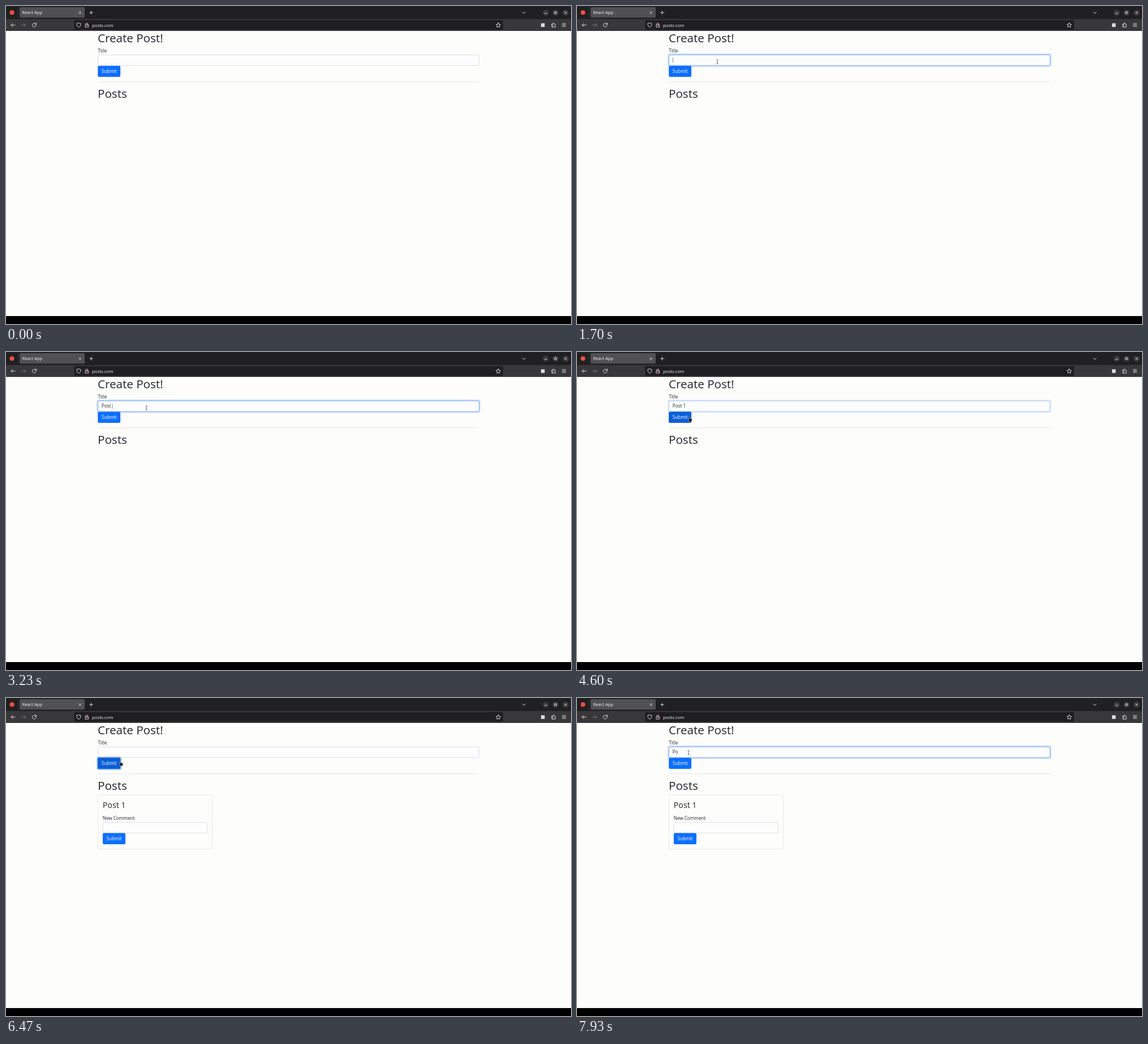
These frames come from a looping animation (998 by 561 pixels, 8 s). An HTML page:

```html
<!DOCTYPE html>
<html lang="en">
<head>
<meta charset="utf-8">
<title>Create Post</title>
<style>
  html, body { margin: 0; width: 100%; height: 100%; overflow: hidden; background: #000; }
  svg { display: block; width: 998px; height: 561px; }
  text { font: 8.15px "Open Sans", "Noto Sans", sans-serif; fill: #212529; white-space: pre; }
  .h1 { font-size: 20.6px; font-weight: 500; }
  .h3 { font-size: 14.2px; font-weight: 500; }
  .bar { font-size: 7.6px; fill: #fbfbfe; }
  .white { fill: #fff; }
  .icon { fill: none; stroke: #ededf0; stroke-width: .9; stroke-linecap: round; stroke-linejoin: round; }
  .field { fill: #fdfdfd; stroke: #d3d6de; stroke-width: .8; }
  .button { fill: #0d6efd; }
</style>
</head>
<body>
<svg viewBox="0 0 998 561">
  <rect width="998" height="547" fill="#fdfdfc"/>

  <!-- Browser frame -->
  <rect width="998" height="23" fill="#202023"/>
  <rect y="23" width="998" height="21" fill="#38383b"/>
  <path d="M21.5 2V21" stroke="#39393d" stroke-width=".8"/>
  <rect x="24" y="2" width="115" height="18.5" rx="2" fill="#515154"/>
  <rect x="120.5" y="25" width="757.5" height="17" rx="2" fill="#1f1f22"/>
  <circle cx="10.5" cy="11.5" r="4" fill="#f0503c"/>
  <text class="bar" x="28.5" y="14.3">React App</text>
  <text class="bar" x="152" y="36.5" style="font-size:7.8px">posts.com</text>
  <g fill="#3c3c3f">
    <circle cx="953.3" cy="11.7" r="5.3"/><circle cx="970.8" cy="11.7" r="5.3"/><circle cx="988.5" cy="11.7" r="5.3"/>
  </g>
  <g class="icon">
    <path d="M129 10l3.4 3.4m0-3.4L129 13.400M147.700 11.700h5.600m-2.800-2.800v5.600"/>
    <path d="M912 10.500l2.700 2.700 2.700-2.700M951.500 13h3.600M969.300 10.200h3v3h-3zM987 10.200l3 3m0-3l-3 3"/>
    <path d="M16 33.600H9m3-3l-3 3 3 3"/>
    <path d="M27.500 33.600h7m-3-3l3 3-3 3" opacity=".35"/>
    <path d="M52.800 31.700a3.400 3.400 0 1 0 .6 2.400M53.500 29.800v2.500H51"/>
    <path d="M128.500 29.800l3.500 1.100c0 3.400-.8 5.300-3.500 6.700-2.700-1.400-3.500-3.300-3.500-6.700z"/>
    <path d="M140.300 33.300h5.200v3.900h-5.200zM141.300 33.300v-1.500a1.600 1.600 0 0 1 3.200 0v1.500"/>
    <path d="M139.500 30l7 7.300" stroke="#e2506f"/>
    <path d="M869.500 29.600l1.200 2.600 2.800.4-2 2 .5 2.800-2.500-1.400-2.500 1.400.5-2.800-2-2 2.800-.4z"/>
    <path d="M964 32h2v-1a1 1 0 0 1 2 0v1h2.200v5.200H964v-1.700h1a1 1 0 0 0 0-2h-1z"/>
    <path d="M982.500 31h6m-6 2.500h6m-6 2.500h6"/>
  </g>
  <rect x="945" y="30.500" width="6.500" height="6.500" fill="#dcdcdf"/>

  <!-- Form -->
  <text class="h1" x="162" y="64.300">Create Post!</text>
  <text x="162.300" y="82.400">Title</text>
  <rect class="field" x="162.500" y="86.300" width="673" height="18.700" rx="2"/>
  <g id="fieldRing" fill="none">
    <rect x="161.200" y="85" width="675.600" height="21.300" rx="3" stroke="#0d6efd" stroke-opacity=".25" stroke-width="2"/>
    <rect x="162.500" y="86.300" width="673" height="18.700" rx="2" stroke="#86b7fe" stroke-width=".9"/>
  </g>
  <text id="typed" x="168.800" y="98.400"></text>
  <rect id="caret" y="91.300" width=".7" height="8.800" fill="#55585c"/>
  <rect id="buttonRing" x="161.200" y="104.500" width="41.800" height="21.500" rx="3" fill="none" stroke="#3184fd" stroke-opacity=".5" stroke-width="2"/>
  <rect class="button" x="162.200" y="105.500" width="39.800" height="19.500" rx="2"/>
  <rect id="hover" x="162.200" y="105.500" width="39.800" height="19.500" rx="2" fill="#0b5ed7"/>
  <text class="white" x="168.800" y="118.100">Submit</text>
  <path d="M162.500 133.800H835.500" stroke="#d8d8da" stroke-width=".7"/>
  <text class="h1" x="162" y="162.400">Posts</text>

  <g id="card">
    <rect x="162.500" y="171.300" width="201.800" height="95.500" rx="2" fill="none" stroke="#dfdfdf" stroke-width=".7"/>
    <text class="h3" x="170.800" y="194.100">Post 1</text>
    <text x="170.800" y="214.900">New Comment</text>
    <rect class="field" x="171.100" y="219.300" width="184.300" height="18.700" rx="2"/>
    <rect class="button" x="170.900" y="238.300" width="40" height="19.600" rx="2"/>
    <text class="white" x="177.500" y="250.900">Submit</text>
  </g>

  <g id="pointer">
    <path id="arrow" d="M0 0V8L1.900 6.300 3.200 9.200 4.500 8.600 3.200 5.800H5.600Z" fill="#222" stroke="#fff" stroke-width=".5"/>
    <path id="beam" d="M-1.700-3.700Q0-3.700 0-2.700Q0-3.700 1.700-3.700M0-2.700V2.700M-1.700 3.700Q0 3.700 0 2.700Q0 3.700 1.700 3.700" fill="none" stroke="#555" stroke-width=".9"/>
    <path id="hand" d="M0 .6Q.8-.4 1.600.6V3L5 3.700Q5.800 4 5.600 5.500L5 9H1.200L-1.200 6Q-1.400 4.800 0 5.300Z" fill="#222" stroke="#fff" stroke-width=".4"/>
  </g>
</svg>

<script>
const LOOP = 8000;
const FOCUS = 1450, CLICK = 4530, CLEAR = 4690, POSTED = 4740, REFOCUS = 6800;

// Pointer stops: time, x, y
const stops = [
  [30, 20, 358], [830, 233, 131], [1250, 248, 98.500], [4050, 248, 98.500],
  [4480, 197.500, 114], [5900, 197.500, 114], [6350, 201, 111], [6490, 201, 111], [6760, 197, 96.500]
];
// Keystrokes: time, resulting text
const keys = [
  [2350, "P"], [2480, "Po"], [2600, "Pos"], [2700, "Post"], [2820, "Post "],
  [3620, "Post 1"], [CLEAR, ""], [7690, "P"], [7830, "Po"]
];

const $ = id => document.getElementById(id);
const show = (id, on) => $(id).setAttribute("opacity", +on);
const ramp = (t, start, length = 150) => Math.min(1, Math.max(0, (t - start) / length));
const smooth = p => p * p * (3 - 2 * p);

function pointerAt(t) {
  const i = stops.findIndex(s => s[0] > t);
  if (i < 0) return stops.at(-1).slice(1);
  if (!i) return stops[0].slice(1);
  const [t0, x0, y0] = stops[i - 1], [t1, x1, y1] = stops[i];
  const p = smooth((t - t0) / (t1 - t0));
  return [x0 + (x1 - x0) * p, y0 + (y1 - y0) * p];
}

function draw(t) {
  const [x, y] = pointerAt(t);
  const overField = x > 162 && x < 836 && y > 86 && y < 105;
  const overButton = x > 162 && x < 203 && y >= 105 && y < 125;
  $("pointer").setAttribute("transform", `translate(${x} ${y})`);
  show("pointer", t >= 30);
  show("beam", overField);
  show("hand", overButton);
  show("arrow", !overField && !overButton);

  const key = keys.findLast(k => k[0] <= t);
  const typed = $("typed");
  typed.textContent = key ? key[1] : "";

  const focusedAt = t >= REFOCUS ? REFOCUS : FOCUS;
  const focused = t >= REFOCUS || (t >= FOCUS && t < CLICK);
  const since = t - Math.max(focusedAt, t < CLICK && key ? key[0] : 0);
  show("caret", focused && since % 1200 < 600);
  $("caret").setAttribute("x", 168.900 + typed.getComputedTextLength());

  show("fieldRing", ramp(t, FOCUS) - ramp(t, CLICK) + ramp(t, REFOCUS));
  show("buttonRing", ramp(t, CLICK + 90) - ramp(t, REFOCUS));
  show("hover", ramp(t, 4330) - ramp(t, 6640));
  show("card", t >= POSTED);
}

function frame() {
  draw(performance.now() % LOOP);
  requestAnimationFrame(frame);
}
frame();
</script>
</body>
</html>
```
